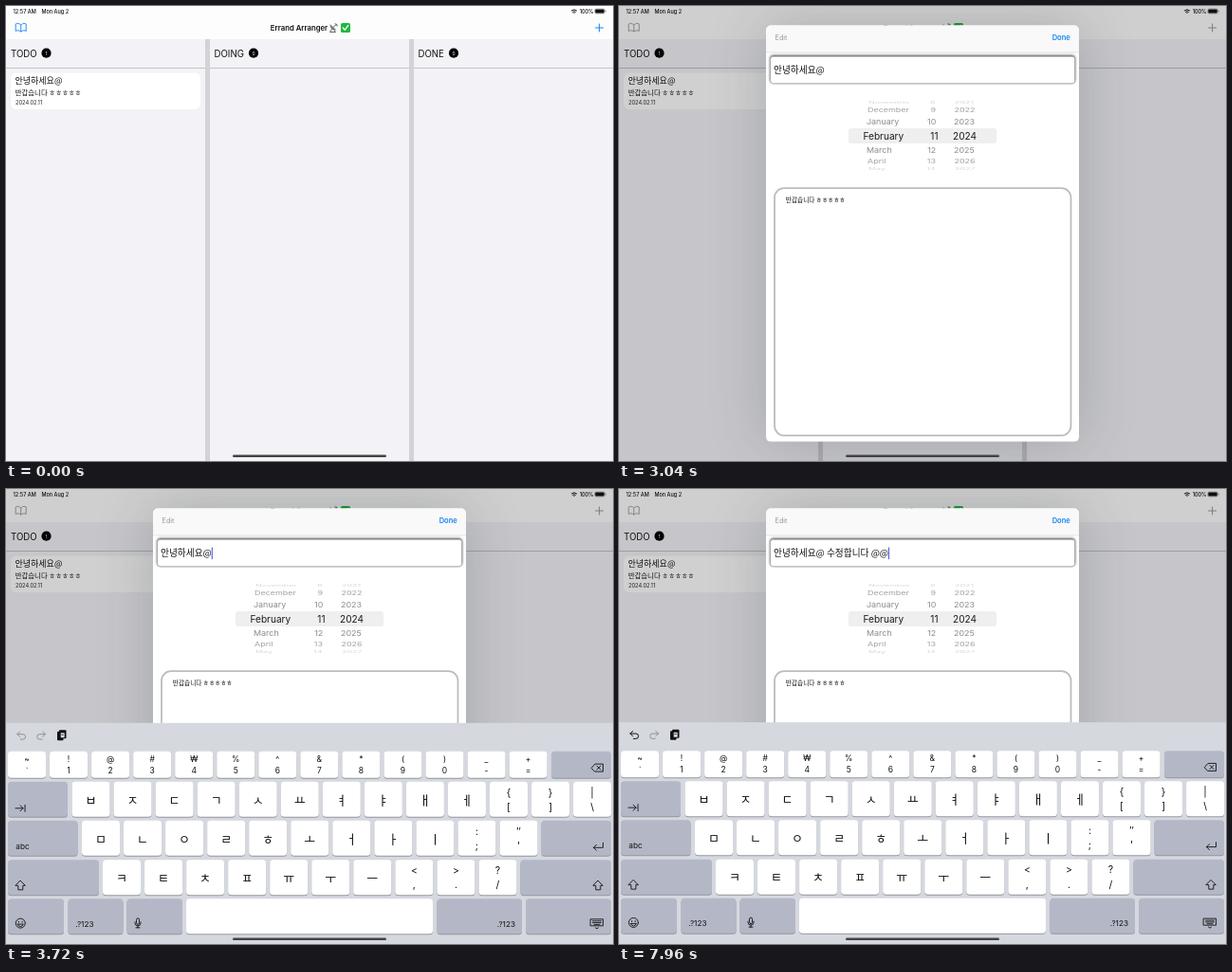
An HTML page with a canvas for the animation above (8 s loop, 640x480 px).

```html
<!DOCTYPE html>
<html lang="ko">
<head>
<meta charset="utf-8">
<title>Errand Arranger</title>
<style>
html, body { margin: 0; width: 100%; height: 100%; overflow: hidden; background: #f2f2f7; }
canvas { display: block; }
</style>
</head>
<body>
<canvas id="stage" width="640" height="480"></canvas>
<script>
const c = document.getElementById('stage').getContext('2d');
const LOOP = 8000, BLUE = '#1583f5', INK = '#111';
const LATIN = 'Inter, "Noto Sans CJK KR", "Noto Sans CJK", sans-serif';
const HANGUL = '"Noto Sans CJK KR", "Noto Sans CJK", sans-serif';
const SHEET_Y = 20.6, KEYS_Y = 246;

// Moments at which moving parts step forward
const ticks = [0, 500, 620, 750, 860, 970, 1080, 2100,
  3040, 3160, 3270, 3390, 3510, 3610, 3720, 3830];

const typed = [
  [0, ''], [3960, ' '], [4350, ' ㅅ'], [4790, ' 수'], [4970, ' 수정'], [5090, ' 수정ㅎ'],
  [5230, ' 수정하'], [5340, ' 수정합'], [5460, ' 수정합ㄴ'], [5580, ' 수정합니'],
  [5700, ' 수정합닏'], [5980, ' 수정합니다'], [6260, ' 수정합니다 @'], [6770, ' 수정합니다 @@']
];
const caretFade = [[0, 0], [3160, 1], [7060, .8], [7300, .4], [7420, 0], [7960, 1]];

const at = (list, t) => list.filter(e => e[0] <= t).pop()[1];

// Share of the way still to go for a critically damped spring
function remaining(t, start) {
  const x = Math.max(0, t - start) * 0.01826;
  return (1 + x) * Math.exp(-x);
}

function rect(x, y, w, h, color) {
  c.fillStyle = color;
  c.fillRect(x, y, w, h);
}

function round(x, y, w, h, r, color) {
  c.beginPath();
  c.roundRect(x, y, w, h, r);
  c.fillStyle = color;
  c.fill();
}

function dot(x, y, r, color) {
  c.beginPath();
  c.arc(x, y, r, 0, 7);
  c.fillStyle = color;
  c.fill();
}

// y is the middle of the capitals
function text(s, x, y, size, color = INK, align = 'left', weight = 400, family = LATIN) {
  c.font = `${weight} ${size}px ${family}`;
  c.textAlign = align;
  c.fillStyle = color;
  c.fillText(s, x, y + size * 0.365);
}

const hangul = (s, x, y, size, align) => text(s, x, y, size, INK, align, 400, HANGUL);

function icon(d, x, y, color = INK, width = 0.9, flip = 1) {
  c.save();
  c.translate(x, y);
  c.scale(flip, 1);
  c.strokeStyle = color;
  c.lineWidth = width;
  c.lineCap = c.lineJoin = 'round';
  c.stroke(new Path2D(d));
  c.restore();
}

function statusBar() {
  text('12:57 AM', 7.5, 5.5, 5.5, INK, 'left', 500);
  text('Mon Aug 2', 37.5, 5.5, 5.5, INK, 'left', 500);
  icon('M-2.6-1.2Q0-3.4 2.6-1.2M-1.4.2Q0-1 1.4.2M0 1.4V1.5', 599, 6, INK, 1);
  text('100%', 619.5, 5.5, 5.5, INK, 'right', 500);
  c.strokeStyle = '#777';
  c.lineWidth = 0.5;
  c.beginPath();
  c.roundRect(620.7, 3, 10.6, 5, 1.5);
  c.stroke();
  round(621.3, 3.6, 9.4, 3.8, 1, INK);
  rect(631.8, 4.7, 0.8, 1.6, '#777');
}

function dish(x, y) {
  c.fillStyle = '#77797c';
  c.fill(new Path2D(`M${x - 4} ${y - 4}Q${x - 4} ${y + 3} ${x + 3} ${y + 2.5}Z`));
  icon('M-2 1.5L-4 4.5H2L0 2M-.5-.8L3-3.5M1.5-4.3Q4-4.5 3.8-1.8', x, y, '#55575a', 0.9);
}

function board(p) {
  rect(0, 0, 640, 480, '#f2f2f7');
  rect(0, 0, 640, 35, '#fdfdfd');
  statusBar();
  const mix = (a, b) => Math.round(a + (b - a) * p);
  const tint = `rgb(${mix(21, 150)},${mix(131, 152)},${mix(245, 156)})`;
  icon('M0-3C-2-5-4-5-5.5-4V3.5C-4 2.5-2 2.5 0 4C2 2.5 4 2.5 5.5 3.5V-4C4-5 2-5 0-3V4', 15.7, 23, tint, 0.9);
  icon('M-4 0H4M0-4V4', 625.6, 23, tint, 1);
  text('Errand Arranger', 309, 23, 7.75, INK, 'center', 600);
  dish(345.5, 23);
  round(353, 18, 10, 10, 1.6, '#1fb83f');
  icon('M-2.7 0L-.8 2.3L2.8-2.6', 358, 23, '#fff', 1.3);

  rect(0, 65, 640, 1, '#c3c3c8');
  rect(210, 35, 5, 445, '#d2d2d7');
  rect(425, 35, 5, 445, '#d2d2d7');
  [['TODO', 5, 42.5, 1], ['DOING', 219.5, 261, 0], ['DONE', 434.5, 472, 0]].forEach(([name, x, bx, n]) => {
    text(name, x, 50, 9.65);
    dot(bx, 49.7, 5.1, '#000');
    text(n, bx, 49.7, 5, '#fff', 'center');
  });

  round(5, 70.5, 200, 38.5, 6, '#fff');
  hangul('안녕하세요@', 9.5, 78.3, 9);
  hangul('반갑습니다 ㅎㅎㅎㅎㅎ', 9.7, 91, 7.4);
  text('2024.02.11', 10, 102, 5.7, '#222');
}

function picker(mid, strength) {
  const months = ['November', 'December', 'January', 'February', 'March', 'April', 'May'];
  round(242, mid - 8, 156, 16, 3, '#efeff0');
  months.forEach((month, i) => {
    const k = i - 3, angle = k * 0.407, far = Math.abs(k);
    const size = k ? 8.95 : 10.1;
    const color = k ? '#777' : '#1c1c1e';
    c.save();
    c.globalAlpha = strength * [1, 0.85, 0.7, 0.3][far];
    c.translate(0, mid + 37 * Math.sin(angle));
    c.scale(1, Math.cos(angle));
    text(month, [257.5, 261, 262, 263][far], 0, size, color);
    text(11 + k, [336.5, 334.3, 334, 333.5][far], 0, size, color, 'right');
    text(2024 + k, [352, 353, 353.5, 354][far], 0, size, color);
    c.restore();
  });
}

function sheet(y, t) {
  const editing = t >= 2100;
  c.save();
  c.shadowColor = 'rgba(40,50,60,.22)';
  c.shadowBlur = 60;
  round(155, y, 330, 439, 5, '#fff');
  c.restore();
  round(155, y, 330, 28, [5, 5, 0, 0], '#f9f9f9');
  rect(155, y + 28, 330, 0.6, '#d0d0d2');
  text('Edit', 164.5, y + 13, 7.3, editing ? '#9a9a9e' : BLUE);
  text('Done', 475.7, y + 13, 7.5, BLUE, 'right', 600);

  c.save();
  c.shadowColor = 'rgba(0,0,0,.85)';
  c.shadowBlur = 3;
  c.shadowOffsetY = -1;
  round(159.6, y + 32.6, 321, 28.6, 3, '#fff');
  c.restore();
  c.lineWidth = 0.8;
  c.strokeStyle = '#a2a2a4';
  c.stroke();
  const line = '안녕하세요@' + at(typed, t);
  hangul(line, 163, y + 47, 9.7);
  const end = 163 + c.measureText(line).width;
  c.globalAlpha = at(caretFade, t);
  rect(end, y + 41, 1.1, 12.5, '#4660e6');
  c.globalAlpha = 1;

  picker(y + 116.5, editing ? 1 : 0.5);

  c.beginPath();
  c.roundRect(164, y + 171.5, 312.5, 261, 10);
  c.lineWidth = 1.8;
  c.strokeStyle = '#bdbdbf';
  c.stroke();
  hangul('반갑습니다 ㅎㅎㅎㅎㅎ', 175.8, y + 184.3, 6.65);
}

const rows = [
  [22, 290, 28, '~` !1 @2 #3 ₩4 %5 ^6 &7 *8 (9 )0 _- +='],
  [89.5, 326.5, 37, 'ㅂ ㅈ ㄷ ㄱ ㅅ ㅛ ㅕ ㅑ ㅐ ㅔ {[ }] |\\'],
  [100, 367.5, 37, 'ㅁ ㄴ ㅇ ㄹ ㅎ ㅗ ㅓ ㅏ ㅣ :; ″\''],
  [122, 409, 37, 'ㅋ ㅌ ㅊ ㅍ ㅠ ㅜ ㅡ <, >. ?/']
];
// left, right and middle of the grey keys
const greys = [
  [575, 638, 290, 28], [2, 65, 326.5], [2, 75.5, 367.5], [564.5, 638, 367.5],
  [2, 98, 409], [542.5, 638, 409], [2, 61, 450], [65.5, 123.5, 450],
  [127.5, 186, 450], [454.5, 544, 450], [548, 638, 450]
];

function key(x, mid, w, h, color) {
  round(x, mid - h / 2 + 1, w, h, 3.5, '#94979f');
  round(x, mid - h / 2, w, h, 3.5, color);
}

function keyIcons() {
  const shift = 'M0-5L5 0H2.5V4.5H-2.5V0H-5Z';
  icon('M-6 0L-2.5-4H6V4H-2.5ZM-.5-2L3.5 2M3.5-2L-.5 2', 623.5, 293.3);
  icon('M-5 0H3M0-3L3 0L0 3M5-3.5V3.5', 15, 336);
  icon('M5-4V1H-5M-2-2L-5 1L-2 4', 624.5, 376.5);
  icon(shift, 15.3, 417.5);
  icon(shift, 624.3, 417.5);
  icon('M5 0A5 5 0 1 1-5 0A5 5 0 1 1 5 0M-1.8-1.8V-1M1.8-1.8V-1M-3 1H3Q2 3.5 0 3.5T-3 1', 15.3, 457.3);
  icon('M-1.5-3.5A1.5 1.5 0 0 1 1.5-3.5V0A1.5 1.5 0 0 1-1.5 0ZM-3-1V0A3 3 0 0 0 3 0V-1M0 3V5M-2 5H2', 139, 457);
  icon('M-6.5-4H6.5V3H-6.5ZM-4.5-2H4.5M-4.5-.2H4.5M-3 1.6H3M-1.5 5L0 6L1.5 5', 623, 457, INK, 0.9);
}

function keyboard(shift, undoReady) {
  c.save();
  c.translate(0, shift);
  rect(0, KEYS_Y, 640, 240, '#d6d8df');
  const bend = 'M-1.8-4.3L-4.5-1.6L-1.8 1M-4.5-1.6H1.5A2.7 2.7 0 0 1 1.5 3.8H-1';
  icon(bend, 16.3, 259.5, undoReady ? INK : '#8d9097', 1);
  icon(bend, 37, 259.5, '#8d9097', 1, -1);
  round(54, 255, 6.5, 9.5, 1, '#111');
  round(56, 253.5, 7.5, 9, 1, '#111');
  round(57.7, 256.5, 4, 5, 0.5, '#d6d8df');
  rect(58.4, 258, 2.4, 0.7, '#111');

  rows.forEach(([x0, mid, h, labels], r) => labels.split(' ').forEach((label, i) => {
    const x = x0 + i * 44.05;
    key(x - 20, mid, 40, h, '#fff');
    if (label.length > 1) {
      const gap = r ? 7.6 : 6, size = r ? 10.5 : 8.5;
      text(label[0], x, mid - gap, size, INK, 'center');
      text(label[1], x, mid + gap, size, INK, 'center');
    } else {
      hangul(label, x, mid + 0.5, 13, 'center');
    }
  }));
  greys.forEach(([l, r, mid, h = 37]) => key(l, mid, r - l, h, '#b4b8c6'));
  key(190, 450, 260, 37, '#fff');
  text('abc', 10.3, 376, 8.2);
  text('.?123', 73.3, 458, 8.2);
  text('.?123', 537, 458, 8.2, INK, 'right');
  keyIcons();
  c.restore();
}

function draw(t) {
  const step = ticks.filter(k => k <= t).pop();
  const sheetLeft = remaining(step, 639.5);
  const keysLeft = remaining(step, 3290);
  const p = 1 - sheetLeft;
  board(p);
  if (p > 0) {
    rect(0, 0, 640, 480, `rgba(0,0,0,${0.185 * p})`);
    sheet(SHEET_Y + (480 - SHEET_Y) * sheetLeft, t);
  }
  if (keysLeft < 1) keyboard(234 * keysLeft, t >= 4070);
  round(239, 473.4, 162, 2.6, 1.3, '#444');
}

function frame(now) {
  draw(now % LOOP);
  requestAnimationFrame(frame);
}
requestAnimationFrame(frame);
</script>
</body>
</html>
```
